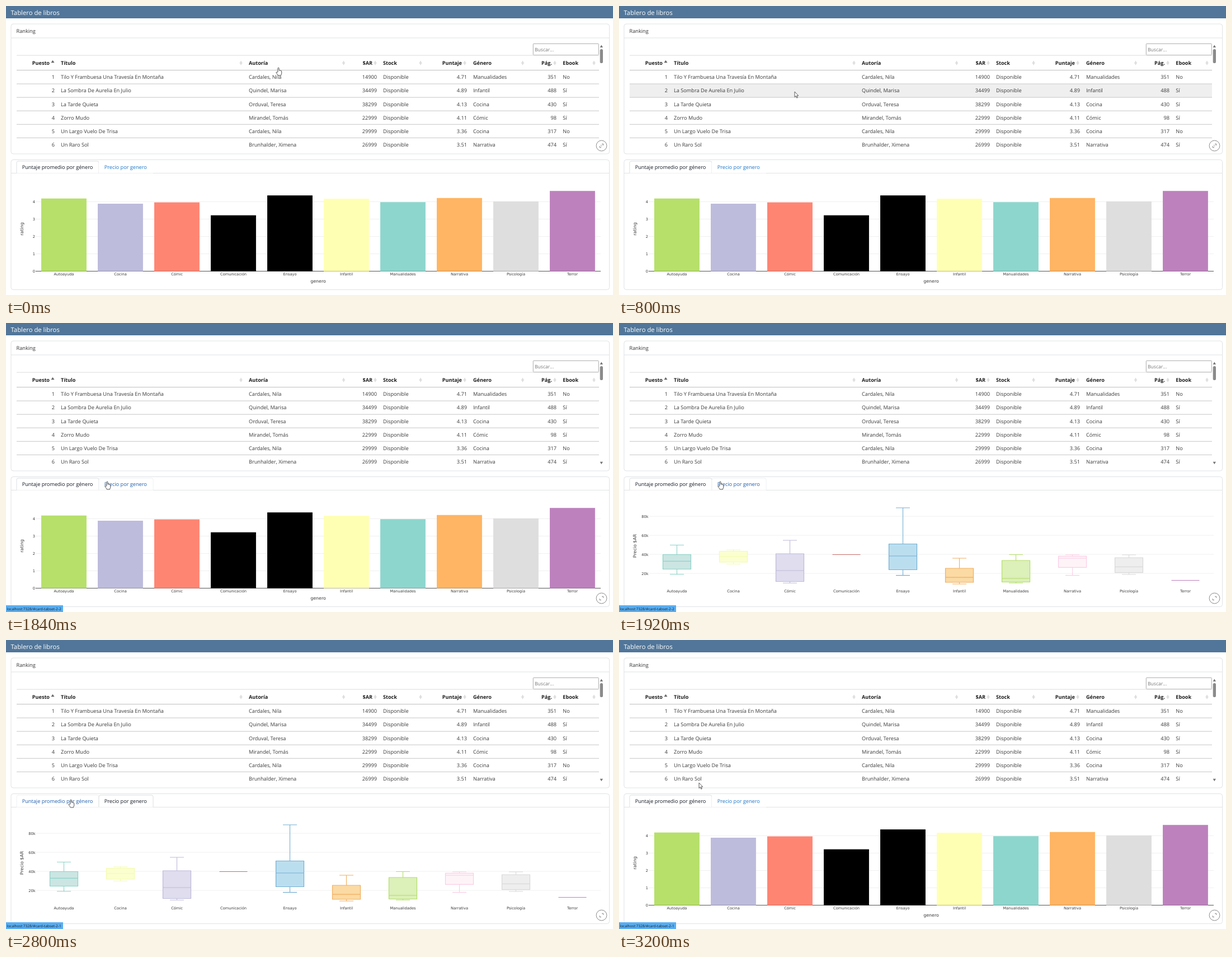
These frames come from a looping animation (1085x516 px, 3280 ms). An HTML page:

```html
<!DOCTYPE html>
<html lang="es">
<head>
<meta charset="utf-8">
<title>Tablero de libros</title>
<style>
html, body { margin: 0; width: 100%; height: 100%; overflow: hidden; background: #fff; }
svg { display: block; width: 100%; height: 100%; }
text { font-family: "Open Sans", "Noto Sans", sans-serif; font-size: 9.18px; fill: #3a3a3a; text-rendering: geometricPrecision; white-space: pre; }
.head { font-size: 9.1px; font-weight: 700; fill: #1e1e1e; }
.tick { font-family: "DejaVu Sans", sans-serif; font-size: 6.65px; fill: #3a3a3a; }
.axis { font-family: "DejaVu Sans", sans-serif; font-size: 7.9px; fill: #3a3a3a; }
</style>
</head>
<body>
<svg id="stage" viewBox="0 0 1085 516" xmlns="http://www.w3.org/2000/svg"></svg>
<script>
const LOOP = 3280, STEP = 80;
const genres = ["Autoayuda", "Cocina", "Cómic", "Comunicación", "Ensayo", "Infantil",
  "Manualidades", "Narrativa", "Psicología", "Terror"];

const books = [
  ["Tilo Y Frambuesa Una Travesía En Montaña", "Cardales, Nila", 14900, "4.71", "Manualidades", 351, "No"],
  ["La Sombra De Aurelia En Julio", "Quindel, Marisa", 34499, "4.89", "Infantil", 488, "Sí"],
  ["La Tarde Quieta", "Orduval, Teresa", 38299, "4.13", "Cocina", 430, "Sí"],
  ["Zorro Mudo", "Mirandel, Tomás", 22999, "4.11", "Cómic", 98, "Sí"],
  ["Un Largo Vuelo De Trisa", "Cardales, Nila", 29999, "3.36", "Cocina", 317, "No"],
  ["Un Raro Sol", "Brunhalder, Ximena", 26999, "3.51", "Narrativa", 474, "Sí"]
];

// title, header x, cell x, right-aligned, sort icon x
const columns = [
  ["Puesto", 78, 87, 1, 83.5], ["Título", 98, 98, 0, 420], ["Autoría", 434, 434, 0, 603.5],
  ["$AR", 655, 663, 1, 660], ["Stock", 674, 674, 0, 741], ["Puntaje", 815, 824, 1, 820],
  ["Género", 835, 835, 0, 923.5], ["Pág.", 976, 984, 1, 981], ["Ebook", 995.3, 995.3, 0, 1051]
];

const bars = [
  [343.7, "#b6e06a"], [353, "#bdbcdc"], [350.6, "#ff8573"], [373.7, "#000"], [338.2, "#000"],
  [344.2, "#ffffb4"], [350.2, "#8dd6cd"], [342.8, "#ffb563"], [348.8, "#dedede"], [330.2, "#bd82bd"]
];

// upper whisker, upper quartile, median, lower quartile, lower whisker, stroke, fill
const boxes = [
  [396.5, 413.5, 425.3, 439.5, 448.8, "#8dd3c7", "#cbe5e3"],
  [405, 407.5, 417, 427, 430.3, "#f3fbae", "#fbffd0"],
  [388, 412, 442, 461.5, 464.2, "#bebada", "#dfddee"],
  [413.5, 413.5, 413.5, 413.5, 413.5, "#c9706c", "none"],
  [330, 394.5, 416, 440.5, 450.6, "#76afd2", "#bbdeef"],
  [420, 438, 454.2, 463, 466, "#f1ae60", "#fbdaa4"],
  [413.5, 424, 456, 462.5, 464.3, "#b3de69", "#dcf0b9"],
  [413.7, 416.4, 420, 436.3, 450.6, "#fbcde4", "#fef4f8"],
  [414, 419, 435.3, 445.6, 449, "#d9d9d9", "#eeeeee"],
  [459.5, 459.5, 459.5, 459.5, 459.5, "#bc80bd", "none"]
];

// time, x, y of the pointer tip
const path = [
  [0, 487, 111], [80, 485, 112], [400, 398, 131], [480, 398, 131], [800, 314, 153],
  [1040, 236, 214], [1200, 190, 266], [1280, 175, 275], [1440, 181, 284], [2080, 181, 284],
  [2640, 116, 286], [3040, 116, 286], [3120, 128, 275], [3200, 143, 255], [LOOP, 143, 255]
];

const text = (x, y, s, attrs = "") => `<text x="${x}" y="${y}" ${attrs}>${s}</text>`;
const rect = (x, y, w, h, fill, attrs = "") =>
  `<rect x="${x}" y="${y}" width="${w}" height="${h}" fill="${fill}" ${attrs}/>`;
const shape = (d, stroke, fill = "none", attrs = "") =>
  `<path d="${d}" stroke="${stroke}" fill="${fill}" ${attrs}/>`;
const group = (id, body) => `<g id="${id}">${body}</g>`;
const center = i => 103.5 + 101 * i;
const rowTop = i => 115 + 24.1 * i;

function sortIcon(x, sorted) {
  if (sorted) return shape(`M${x - 3} 101.2l3-4.4 3 4.4z`, "none", "#666");
  return shape(`M${x - 2.8} 101.7l2.8-3.6 2.8 3.6-2.8 3.6z`, "none", "#e2e2e2") +
    rect(x - 0.4, 97.8, 0.8, 7.8, "#dadada");
}

function table() {
  let s = rect(19, 87.6, 1041, 1, "#dcdcdc") + rect(19, 114, 1041, 1.1, "#c2c2c2");
  const cell = (x, y, v, right, cls) =>
    text(x, y, v, `class="${cls}" text-anchor="${right ? "end" : "start"}"`);
  columns.forEach(([title, hx, , right, icon], i) => {
    s += cell(hx, 104.7, title, right, "head") + sortIcon(icon, i === 0);
  });
  books.forEach(([title, author, price, score, genre, pages, ebook], r) => {
    const values = [r + 1, title, author, price, "Disponible", score, genre, pages, ebook];
    columns.forEach(([, , x, right], i) => { s += cell(x, 130.4 + 24.05 * r, values[i], right, "cell"); });
    if (r) s += rect(19, rowTop(r) - 0.6, 1041, 1.1, "#cbcbcb");
  });
  return s;
}

function card(y) {
  return rect(9, y, 1069.5, 232, "#fff", 'rx="4" stroke="#e0e2e4"');
}

function yAxis(labels, x0, y0, gap) {
  return labels.map((v, i) => rect(x0, y0 + gap * i, 1063 - x0, 1, "#f0f0f0") +
    text(x0 - 1.5, y0 + gap * i + 2.9, v, 'class="tick" text-anchor="end"')).join("");
}

function xLabels() {
  return genres.map((g, i) => text(center(i), 480.9, g, 'class="tick" text-anchor="middle"')).join("");
}

const yTitle = s => text(0, 0, s, 'class="axis" text-anchor="middle" transform="translate(31.3 398) rotate(-90)"');

function barChart() {
  let s = yAxis([4, 3, 2, 1, 0], 53.5, 349, 31) + rect(53, 473, 1010, 1, "#555");
  s += bars.map(([y, fill], i) => rect(center(i) - 40.5, y, 80.9, 473.6 - y, fill)).join("");
  return s + xLabels() + yTitle("rating") +
    text(558, 494.3, "genero", 'class="axis" text-anchor="middle"');
}

function boxChart() {
  let s = yAxis(["80k", "60k", "40k", "20k"], 54, 344.6, 34);
  boxes.forEach(([top, q3, mid, q1, low, stroke, fill], i) => {
    const x = center(i), l = x - 25;
    if (top === low) { s += shape(`M${l} ${mid}h50`, stroke, "none", 'stroke-width="1.1"'); return; }
    s += shape(`M${x - 12.5} ${top}h25M${x} ${top}V${q3}M${x} ${q1}V${low}M${x - 12.5} ${low}h25`, stroke, "none", 'stroke-width="1.1"') +
      shape(`M${l} ${q3}h50V${q1}h-50zM${l} ${mid}h50`, stroke, fill, 'stroke-width="1.2"');
  });
  return s + xLabels() + yTitle("Precio $AR");
}

function tabShape(id, x, w) {
  return `<path id="${id}" d="M${x} 298.5V280q0-3 3-3h${w - 6}q3 0 3 3v18.5" fill="#fff"/>`;
}

function scrollbar() {
  return shape("M1061.6 74l2.7-4.4 2.7 4.4z", "none", "#777") +
    rect(1061.7, 77, 5.3, 25, "#8b8b8b", 'rx="2.6"') +
    shape("M1061.6 247.8l2.7 4.4 2.7-4.4z", "none", "#777");
}

const expandButton = `<circle r="9.4" fill="#fff" fill-opacity=".75" stroke="#8a8a8a"/>` +
  shape("M.6-3.2H3.2V-.6M-.6 3.2H-3.2V.6", "#777", "none", 'stroke-width=".9"');

const arrow = shape("M0 0V9.6L2.2 7.6 3.8 11.2 5.3 10.5 3.8 7.1H6.7Z", "#333", "#fff", 'stroke-width=".8"');
const hand = shape("M-1.1 7V.3a1.1 1.1 0 0 1 2.2 0V4q1-.6 1.7.3 1-.4 1.6.4 1.3-.2 1.3 1.2V9q0 2-1.1 3v1H-.8q-.3-1.2-2-3.2l-1.3-1.9q0-1.2 1.2-.8z",
  "#333", "#fff", 'stroke-width=".85" stroke-linejoin="round"');

const stage = document.getElementById("stage");
stage.innerHTML =
  rect(0, 0, 1085, 22, "#517699") +
  text(8.5, 15.7, "Tablero de libros", 'style="font-size:11.3px;fill:#fff"') +
  card(32) + rect(9, 56.5, 1069.5, 1, "#e0e2e4") +
  text(18.5, 48, "Ranking", 'style="fill:#333"') +
  rect(19, 0, 1041, 23.4, "#efefef", 'id="hover"') +
  rect(942.3, 67.3, 117, 20.2, "#fff", 'stroke="#aaa" rx="1"') +
  text(945, 80.7, "Buscar...", 'style="font-size:8.6px;fill:#777"') +
  table() + scrollbar() +
  card(274.5) + rect(9, 298, 1069.5, 1, "#e0e2e4") +
  tabShape("tab1", 19, 147) + tabShape("tab2", 166, 97) +
  text(28.7, 291.1, "Puntaje promedio por género", 'id="label1"') +
  text(175.7, 291.1, "Precio por genero", 'id="label2"') +
  group("barChart", barChart()) + group("boxChart", boxChart()) +
  group("expand", expandButton) +
  group("status", rect(0, 504, 102, 12, "#58aef2") +
    text(1.5, 512.5, "", 'id="link" style="font-size:6.57px;fill:#16202a"')) +
  group("arrow", arrow) + group("hand", hand);

const el = id => document.getElementById(id);
const show = (id, on) => el(id).setAttribute("display", on ? "inline" : "none");
const place = (id, x, y) => el(id).setAttribute("transform", `translate(${x} ${y})`);

function pointer(t) {
  const i = path.findIndex(p => p[0] > t);
  const [t0, x0, y0] = path[i - 1], [t1, x1, y1] = path[i];
  const k = (t - t0) / (t1 - t0);
  return [x0 + (x1 - x0) * k, y0 + (y1 - y0) * k];
}

function drawTab(n, active, over) {
  const tab = el("tab" + n);
  tab.setAttribute("stroke", active ? "#dcdfe2" : over ? "#eef0f2" : "none");
  el("label" + n).style.fill = active ? "#141a24" : over ? "#1f5fae" : "#1c76c8";
}

function draw(ms) {
  const t = Math.floor((ms % LOOP) / STEP) * STEP;
  const [x, y] = pointer(t);
  const lower = t >= 1200;
  const onTab = lower && y > 277 && x > 19 && x < 263;
  const tabOver = onTab ? (x < 166 ? 1 : 2) : 0;
  const second = t >= 2000 && t < 3120;
  const boxesOn = t >= 1920 && t < 3040;

  const row = Math.floor((y - 115) / 24.1);
  show("hover", !lower && row >= 0 && row < 6);
  el("hover").setAttribute("y", rowTop(Math.max(row, 0)) + 0.4);

  show("barChart", !boxesOn);
  show("boxChart", boxesOn);
  drawTab(1, !second, tabOver === 1);
  drawTab(2, second, tabOver === 2);

  place("expand", 1064.5, lower ? 491.5 : 249.5);
  show("status", t >= 1600);
  el("link").textContent = "localhost:7328/#card-tabset-2-" + (x < 166 ? 1 : 2);

  const pointing = onTab || y < 115;
  show("hand", pointing);
  show("arrow", !pointing);
  place(pointing ? "hand" : "arrow", x, y);
}

const start = performance.now();
function tick() {
  draw(performance.now() - start);
  requestAnimationFrame(tick);
}
tick();
</script>
</body>
</html>
```
